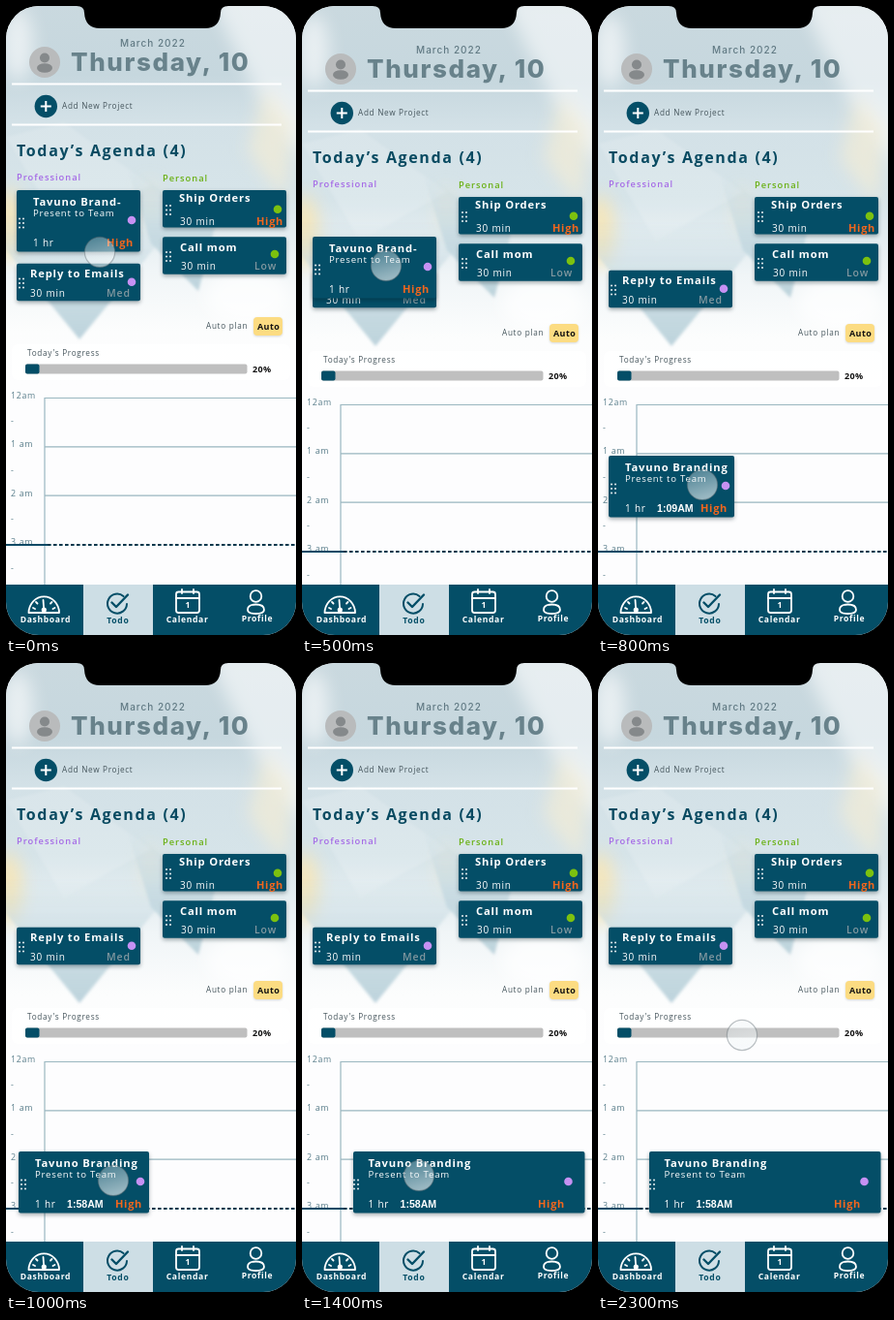
Recreate the animation shown at these times as an HTML page. Size 300 by 649 pixels, loop 2400 ms.

```html
<!DOCTYPE html>
<html lang="en">
<head>
<meta charset="utf-8">
<title>Daily planner</title>
<style>
html, body { margin: 0; width: 100%; height: 100%; overflow: hidden; background: #000; }
svg { display: block; width: 300px; height: 649px; }
text { font-family: "Open Sans", "Noto Sans", sans-serif; white-space: pre; }
.big { font: 800 26px Inter, sans-serif; letter-spacing: 1.6px; fill: #68828b; }
.month { font: 500 10px Inter, sans-serif; letter-spacing: 1px; fill: #607983; }
.h1 { font-size: 16px; font-weight: 700; letter-spacing: 1.65px; fill: #084a61; }
.group { font-size: 9.3px; font-weight: 600; letter-spacing: 1px; }
.title { font-size: 11.2px; font-weight: 700; letter-spacing: .85px; fill: #fff; }
.sub { font-size: 9.6px; letter-spacing: .8px; fill: #fff; }
.len { font-size: 10px; font-weight: 500; letter-spacing: .8px; fill: #fff; }
.high { font-size: 11px; font-weight: 700; letter-spacing: .7px; fill: #f4661c; }
.rank { font-size: 10.5px; font-weight: 600; letter-spacing: .9px; fill: #81979f; }
.small { font-size: 8.2px; letter-spacing: .7px; fill: #46565d; }
.bold { font-size: 9px; font-weight: 700; letter-spacing: .4px; fill: #111; }
.hour { font-size: 8.8px; letter-spacing: .7px; fill: #5a7e8b; }
.clock { font: 700 10.6px "Liberation Sans", Arial, sans-serif; fill: #fff; }
.tab { font-size: 8.6px; font-weight: 700; letter-spacing: .65px; fill: #fff; }
.card { fill: #044e67; filter: drop-shadow(0 2px 2px rgba(0, 20, 30, .35)); }
.icon { fill: none; stroke: #fff; stroke-width: 1.8; stroke-linecap: round; stroke-linejoin: round; }
</style>
</head>
<body>
<svg viewBox="0 0 300 649">
  <defs>
    <linearGradient id="sky" x1="0" y1="0" x2="0" y2="1">
      <stop offset="0" stop-color="#cad9df"/>
      <stop offset=".2" stop-color="#c6d7de"/>
      <stop offset=".32" stop-color="#d3e1e7"/>
      <stop offset=".5" stop-color="#d6e4e9"/>
      <stop offset=".7" stop-color="#f0f5f7"/>
      <stop offset=".86" stop-color="#fcfdfd"/>
      <stop offset="1" stop-color="#fdfdfe"/>
    </linearGradient>
    <linearGradient id="shard" x1="0" y1="0" x2="0" y2="1">
      <stop offset="0" stop-color="#c3d8e0" stop-opacity="0"/>
      <stop offset=".55" stop-color="#c3d8e0" stop-opacity=".85"/>
      <stop offset="1" stop-color="#bdd3dc"/>
    </linearGradient>
    <linearGradient id="glass" x1="0" y1="0" x2=".3" y2="1">
      <stop offset="0" stop-color="#eaf1f4" stop-opacity=".3"/>
      <stop offset="1" stop-color="#f4f8f9" stop-opacity=".62"/>
    </linearGradient>
    <filter id="soft"><feGaussianBlur stdDeviation="1.5"/></filter>
    <filter id="haze" x="-1" y="-1" width="3" height="3"><feGaussianBlur stdDeviation="9"/></filter>
    <clipPath id="screen"><rect width="300" height="649" rx="34"/></clipPath>
    <clipPath id="view"><rect width="300" height="597"/></clipPath>
  </defs>
  <rect width="300" height="649"/>
  <g clip-path="url(#screen)">
    <rect width="300" height="649" fill="#fdfdfe"/>
    <g clip-path="url(#view)">
      <g id="page">
        <rect y="-10" width="300" height="402" fill="url(#sky)"/>
        <g filter="url(#haze)">
          <ellipse cx="12" cy="40" rx="16" ry="38" fill="#fff" opacity=".6"/>
          <path d="M205 -20H320V170L262 95Z" fill="#fff" opacity=".55"/>
          <path d="M268 85L298 120L288 200L250 150Z" fill="#f9efd3" opacity=".6"/>
          <ellipse cx="2" cy="226" rx="15" ry="38" fill="#f8e6b2" opacity=".85"/>
          <ellipse cx="149" cy="205" rx="8" ry="25" fill="#f5ecd0" opacity=".5"/>
          <ellipse cx="250" cy="300" rx="45" ry="30" fill="#fff" opacity=".7"/>
        </g>
        <g filter="url(#soft)">
          <path d="M0 135L60 120L150 185L60 235Z" fill="#fff" opacity=".15"/>
          <path d="M-30 215H182L76 344Z" fill="url(#shard)"/>
          <path d="M125 165L216 228L199 294L150 245Z" fill="url(#shard)"/>
        </g>
      </g>
    </g>
    <g id="drag"></g>
    <g id="nav"></g>
    <circle id="cursor" r="15.6" fill="url(#glass)" stroke="#5d6a70" stroke-opacity=".42" stroke-width="1.2"/>
  </g>
  <path d="M73 0Q81 0 81 7Q82 23 97 23H206Q221 23 222 7Q222 0 230 0Z"/>
</svg>
<script>
const NS = "http://www.w3.org/2000/svg";
const $ = id => document.getElementById(id);

function add(parent, tag, attrs) {
  const el = document.createElementNS(NS, tag);
  for (const k in attrs) el.setAttribute(k, attrs[k]);
  return parent.appendChild(el);
}
// y is the middle of the capitals
function label(parent, cls, x, y, str, more) {
  const el = add(parent, "text", { class: cls, x, ...more });
  el.textContent = str;
  el.setAttribute("y", y + parseFloat(getComputedStyle(el).fontSize) * 0.36);
  return el;
}
const rect = (p, x, y, width, height, fill, rx = 0) => add(p, "rect", { x, y, width, height, fill, rx });
const dot = (p, cx, cy, r, fill) => add(p, "circle", { cx, cy, r, fill });
const line = (p, d, stroke, w, more) => add(p, "path", { d, stroke, "stroke-width": w, fill: "none", ...more });
function grip(p, x, y) {
  for (let i = 0; i < 6; i++) dot(p, x - 2 + (i % 2) * 4, y - 4.5 + (i >> 1) * 4.5, 1.05, "#dfe9ec");
}

const teal = "#044e67", purple = "#c691f3", green = "#7cc10f";
const page = $("page");

function header() {
  dot(page, 40, 58, 16, "#b9bbbc");
  dot(page, 40, 53.5, 5, "#85898b");
  add(page, "ellipse", { cx: 40, cy: 64, rx: 8, ry: 4.8, fill: "#85898b" });
  label(page, "month", 118, 38.2, "March 2022");
  label(page, "big", 67, 57.8, "Thursday, 10");
  line(page, "M6 80.5H285M6 122.5H285", "#fff", 2);
  dot(page, 41.3, 103.5, 11.7, teal);
  line(page, "M35.8 103.5H46.8M41.3 98V109", "#fff", 2);
  label(page, "small", 58, 103.5, "Add New Project");
  label(page, "h1", 11, 149.7, "Today’s Agenda (4)");
  label(page, "group", 11, 177, "Professional", { fill: "#a56ae6" });
  label(page, "group", 162, 177.7, "Personal", { fill: "#69b013", "font-weight": 700 });
}

function task(x, y, name, textX, midY, lenY, rank, rankX, dotX, dotY, color, gripY) {
  add(page, "rect", { class: "card", x, y, width: 128, height: 38.5, rx: 2 });
  label(page, "title", textX, midY, name);
  label(page, "len", textX + (x > 100 ? 1 : 0), lenY, "30 min");
  label(page, rank === "High" ? "high" : "rank", rankX, lenY, rank);
  dot(page, dotX, dotY, 4.3, color);
  grip(page, x + (x > 100 ? 6 : 5), gripY);
}

function progress() {
  label(page, "small", 207, 330, "Auto plan");
  add(page, "rect", { x: 256, y: 321, width: 30, height: 19, rx: 4, fill: "#fcdc82",
    style: "filter:drop-shadow(0 1px 1px rgba(0,0,0,.15))" });
  label(page, "bold", 260, 330.5, "Auto");
  add(page, "rect", { x: 6, y: 349, width: 288, height: 37, rx: 6, fill: "#fff", "fill-opacity": .75 });
  label(page, "small", 22, 357.7, "Today's Progress");
  rect(page, 20, 369.5, 229.5, 10, "#bfbfbf", 2);
  rect(page, 20, 369.5, 14.5, 10, teal, 2);
  label(page, "bold", 255, 374.3, "20%");
}

function timeline() {
  rect(page, 0, 391, 300, 230, "#fdfdfe");
  line(page, "M40 404V620M40 404.5H300M40 454.8H300M40 505.2H300", "#9ab7c0", 1.2);
  ["12am", "1 am", "2 am", "3 am"].forEach((h, i) => {
    label(page, "hour", 5, 401.8 + i * 50.5, h);
    label(page, "hour", 5, 428 + i * 50.5, "-");
  });
  line(page, "M0 556H43", "#0a4a66", 2);
  line(page, "M43 556H300", "#06384c", 2, { "stroke-dasharray": "3.6 2.4" });
}

function navBar() {
  const nav = $("nav");
  rect(nav, 0, 597, 300, 52, teal);
  rect(nav, 80, 597, 72, 52, "#cddee5");
  const icon = (d, more) => add(nav, "path", { class: "icon", d, ...more });
  icon("M23.5 626A15.7 16.5 0 0 1 55 626Z");
  icon("M39.3 624L38.5 613M28 621L30 622M31 615L32.5 616.5M47.5 615L46 616.5M50.5 621L48.5 622", { "stroke-width": 1.5 });
  dot(nav, 39.3, 623, 2.6, "#fff");
  icon("M121.5 609A10 10 0 1 0 125 617", { style: "stroke:" + teal + ";stroke-width:2" });
  icon("M109.5 615.5L114 620L126 607.5", { style: "stroke:" + teal + ";stroke-width:2.4" });
  add(nav, "rect", { class: "icon", x: 176, y: 604.5, width: 24, height: 21.5, rx: 2.5 });
  icon("M176 611H200M182 602V606M194 602V606");
  label(nav, "tab", 185.5, 618.2, "1");
  add(nav, "circle", { class: "icon", cx: 258.5, cy: 609, r: 5.8 });
  icon("M250 623Q250 617.5 258.5 617.5T267 623Q267 627 258.5 627T250 623Z");
  label(nav, "tab", 14.7, 633.3, "Dashboard");
  label(nav, "tab", 104.3, 633.5, "Todo", { style: "fill:" + teal });
  label(nav, "tab", 165.7, 633.3, "Calendar");
  label(nav, "tab", 243.7, 632.3, "Profile");
}

header();
task(11, 265.8, "Reply to Emails", 25, 276, 296.7, "Med", 104, 130, 284.7, purple, 286);
task(162, 190, "Ship Orders", 179, 197.9, 222.5, "High", 259, 281, 209.7, green, 210.5);
task(162, 238.3, "Call mom", 180, 248.5, 268.7, "Low", 257, 278, 256, green, 258.5);
progress();
timeline();
navBar();

const drag = $("drag");
const box = add(drag, "rect", { class: "card", width: 128, height: 63.5, rx: 2 });
const inner = add(drag, "g", {});
const name = label(inner, "title", 17, 11.6, "");
label(inner, "sub", 17, 23.3, "Present to Team");
label(inner, "len", 17, 54, "1 hr");
const clock = label(inner, "clock", 50, 54, "");
const end = add(drag, "g", {});
label(end, "high", -35, 54, "High");
const tag = dot(end, -9, 31, 4.3, purple);
const handle = add(drag, "g", {});
grip(handle, 5, 34);

// keys: [step, value, value, ...]
const pointer = [[0, 97, 254], [1, 96, 251], [2, 92, 243], [3, 86, 233], [4, 83, 229], [5, 87, 268],
  [6, 95, 373], [7, 102, 445], [8, 108, 494], [9, 111, 520], [10, 111, 534], [12, 113, 536],
  [13, 115, 535], [14, 121, 529], [15, 134, 490], [16, 147, 436], [17, 153, 398], [18, 149, 384]];
const cardKeys = [[0, 11, 190, 128], [4, 11, 190, 128], [5, 11, 238, 128], [6, 11, 343, 128],
  [7, 11, 415, 129], [8, 11, 464, 130], [9, 12, 490, 133], [10, 13, 504, 135], [11, 13, 504, 135]];

function at(keys, s) {
  const i = keys.findIndex(k => k[0] >= s);
  if (i < 0) return keys[keys.length - 1].slice(1);
  const b = keys[i], a = keys[Math.max(0, i - 1)];
  const f = b[0] === a[0] ? 0 : (s - a[0]) / (b[0] - a[0]);
  return a.slice(1).map((v, n) => v + (b[n + 1] - v) * f);
}
function clockText(y) {
  const m = Math.round(69 + (y - 464) * 49 / 40);
  return (Math.floor(m / 60) || 12) + ":" + String(m % 60).padStart(2, "0") + "AM";
}
const move = (el, x, y) => el.setAttribute("transform", `translate(${x} ${y})`);

function draw(s) {
  const dropped = s >= 12, planned = s >= 7;
  const [x, y, w] = dropped ? [53, 504, 239.5] : at(cardKeys, s);
  move(page, 0, s >= 5 ? 7 : 0);
  move(drag, x, y);
  move(inner, dropped ? -1.5 : 0, 0);
  move(end, dropped ? w - 13.5 : w, 0);
  move(handle, dropped ? -2 : 0, 0);
  box.setAttribute("width", w);
  tag.setAttribute("cx", dropped ? -3.5 : -9);
  name.textContent = planned ? "Tavuno Branding" : "Tavuno Brand-";
  clock.textContent = planned ? clockText(y) : "";
  move($("cursor"), ...at(pointer, s));
}

let last = -1;
function tick() {
  const s = Math.floor(performance.now() % 2400 / 100);
  if (s !== last) draw(last = s);
  requestAnimationFrame(tick);
}
tick();
</script>
</body>
</html>
```
